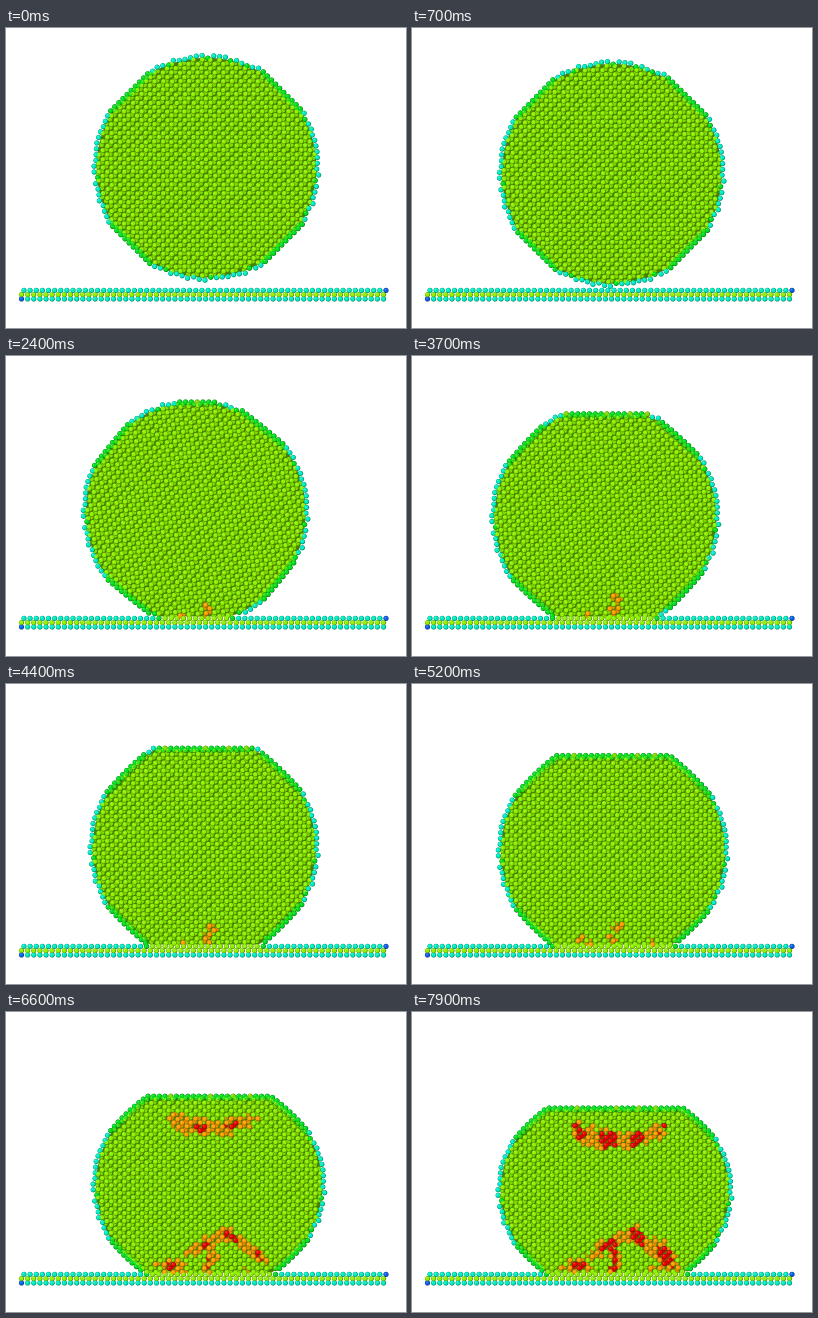
Write a matplotlib script that moves like this. It is 400 px wide and 300 px high and loops after 8 s.

```python
import numpy as np
import matplotlib.pyplot as plt
from matplotlib.animation import FuncAnimation

W, H, DPI = 400, 300, 100
FRAMES, STEP = 80, 100
R = 111.5          # particle radius
PITCH = 6.1        # nearest neighbour distance
BASE = 262         # top row of the substrate
N_RIM = 120

LIME = np.array([0.56, 0.95, 0.0])
GREEN = np.array([0.0, 0.87, 0.12])
CYAN = np.array([0.0, 0.93, 0.76])
BLUE = np.array([0.06, 0.38, 0.92])
ORANGE = np.array([1.0, 0.63, 0.0])
RED = np.array([0.95, 0.02, 0.0])

rng = np.random.default_rng(4)


def ramp(t, a, b):
    return np.clip((t - a) / (b - a), 0, 1)


def bump(t, mid, width):
    return np.exp(-((t - mid) / width) ** 2)


class Pose:
    """Place and shape of the particle at time t in seconds."""

    def __init__(self, t):
        self.t = t
        self.cx = 200.6 - 12 * bump(t, 2.8, 1.25) + 2.5 * ramp(t, 4.5, 6.6)
        self.cy = 139.7 + 8.7 * min(t, 1.4) + 4.2 * max(t - 1.4, 0)
        self.rx = R + 4.6 * ramp(t, 2.4, 7.9)
        self.ry = R - 7.5 * ramp(t, 5, 7.5)
        self.top = 24.2 + 9.1 * t
        self.tilt = -np.radians(6) * bump(t, 2.6, 1.2)
        self.squash = 1 - .11 * ramp(t, 1.4, 7.9)
        self.depth = 1 - .6 * ramp(t, 1, 7)
        self.centre = np.array([self.cx, self.cy])

    def radius(self, a):
        """Relative radius at screen angle a, and whether it is on a facet."""
        half = np.radians(14.5)
        d = np.abs((a - self.tilt) % (np.pi / 2) - np.pi / 4)
        cut = 1 - np.cos(half) / np.cos(d)
        return 1 - self.depth * np.maximum(cut, 0), d < half

    def outline(self):
        a = np.linspace(np.pi / 2, 2.5 * np.pi, 1441)
        rho, flat = self.radius(a)
        x = self.cx + self.rx * rho * np.cos(a)
        y = self.cy + self.ry * rho * np.sin(a)
        return x, np.clip(y, self.top, BASE), flat


# Lattice in the particle frame, rows run from lower left to upper right
k = np.arange(-26, 27) * PITCH
gu, gv = (g.ravel() for g in np.meshgrid(k, k))


def layer(du, dv):
    u, v = gu + du, gv + dv
    pts = np.stack([u - v, u + v], 1) / np.sqrt(2)
    pts = pts[np.hypot(*pts.T) < 1.2 * R]
    return pts + rng.normal(0, .2, pts.shape), rng.uniform(.65, 1.35, len(pts))


FRONT, BACK = layer(0, 0), layer(1.5, PITCH / 2)
rim_inset = rng.uniform(-1, 2.4, N_RIM)

# Substrate: three rows with one loose end on each side
col = np.arange(60) * 6.136
sub = np.vstack([np.stack([x0 + col, np.full(60, y)], 1)
                 for x0, y in ((15.5, 271), (15.5, 266.7), (18, BASE + .4))])
sub_color = np.repeat([CYAN, LIME, CYAN], 60, axis=0)
sub_color[[0, -1]] = BLUE

# Small defects near the contact: x, y, half width, half height, start
SEEDS = [(201, 255, 5, 7, 1.1), (176, 259, 4, 3, 2.0), (205, 244, 7, 5, 3.2),
         (169, 254, 5, 4, 4.6), (240, 258, 4, 3, 4.6),
         (164, 254, 15, 6, 5.4), (203, 246, 6, 14, 5.4)]


def defects(p, noise, pose):
    """Orange and red masks: contact seeds, a chevron below, a bowl above."""
    x, y = p.T
    t = pose.t
    dist = np.full(len(p), 9.0)
    for sx, sy, w, h, start in SEEDS:
        if t >= start:
            dist = np.minimum(dist, np.hypot((x - sx) / w, (y - sy) / h))
    late = ramp(t, 5.4, 6.8)
    if late > 0:
        ridge = 221 + np.where(x < 222, .48 * (222 - x), .75 * (x - 222))
        wide = 8 + 5 * ramp(t, 6.6, 7.9) * ramp(x, 222, 250)
        chevron = np.hypot((y - ridge) / wide, ((x - 221) / 46) ** 4)
        sag = pose.top + 32 - 13 * ((x - 205) / 48) ** 2
        bowl = np.hypot((y - sag) / 9, ((x - 206) / 47) ** 4)
        dist = np.minimum(dist, np.minimum(chevron, bowl) / late)
    clump = np.cos(2 * np.pi * (x - 167) / 29) > .3 - .3 * ramp(t, 6.6, 7.6)
    hot = 1.0 * ramp(t, 5.6, 7.4)
    return dist < noise, clump & (dist < .75 * hot * noise)


def lattice(atoms, pose):
    pts, noise = atoms
    c, s = np.cos(pose.tilt), np.sin(pose.tilt)
    x = pose.cx + (c * pts[:, 0] - s * pts[:, 1]) * pose.rx / R
    y = pose.cy + (s * pts[:, 0] + c * pts[:, 1]) * pose.squash
    nx, ny = (x - pose.cx) / pose.rx, (y - pose.cy) / pose.ry
    rho, _ = pose.radius(np.arctan2(ny, nx))
    keep = (np.hypot(nx, ny) < rho - .02) & (y > pose.top + 2) & (y < BASE - 1)
    p, noise = np.stack([x, y], 1)[keep], noise[keep]
    color = np.tile(LIME, (len(p), 1))
    warm, hot = defects(p, noise, pose)
    color[warm] = ORANGE
    color[hot] = RED
    return p, color


def rim(pose):
    """Surface atoms: green on flat parts, ragged cyan on curved ones."""
    x, y, flat = pose.outline()
    arc = np.r_[0, np.cumsum(np.hypot(np.diff(x), np.diff(y)))]

    def sample(offset):
        s = (np.arange(N_RIM) + offset) / N_RIM * arc[-1]
        p = np.stack([np.interp(s, arc, x), np.interp(s, arc, y)], 1)
        roof = p[:, 1] < pose.top + .3
        return p, roof, roof | (np.interp(s, arc, flat) > .5)

    p, roof, green = sample(.25)
    out = (p - pose.centre) / np.hypot(*(p - pose.centre).T)[:, None]
    p = p - out * np.where(green, 0, rim_inset)[:, None]
    color = np.where((green | (rim_inset > 1.6))[:, None], GREEN, CYAN)
    color[roof & (rim_inset > 1.4)] = LIME * .9
    on = p[:, 1] < BASE - 2

    q, _, dense = sample(.75)
    q = pose.centre + (q - pose.centre) * (1 - 2.4 / R)
    dense &= q[:, 1] < BASE - 5
    inner = np.tile(GREEN * .6 + LIME * .35, (dense.sum(), 1))
    return np.vstack([q[dense], p[on]]), np.vstack([inner, color[on]])


def substrate(pose):
    color = sub_color.copy()
    x, y, _ = pose.outline()
    touch = x[y > BASE - .5]
    if len(touch):
        gap = np.abs(sub[:, 0] - touch.mean()) - np.ptp(touch) / 2
        row = sub[:, 1] < BASE + 2
        color[row & (gap < 4)] = GREEN
        color[row & (gap < -2)] = LIME
    return sub, color


fig = plt.figure(figsize=(W / DPI, H / DPI), dpi=DPI, facecolor="white")
ax = fig.add_axes([0, 0, 1, 1])
ax.set(xlim=(0, W), ylim=(H, 0))
ax.axis("off")


def discs(d, z):
    return ax.scatter([], [], s=(d * 72 / DPI) ** 2, linewidths=0, zorder=z)


body, = ax.fill([0, 1, 1], [0, 0, 1], color=(.29, .50, 0), lw=0, zorder=1)
rear = discs(4.4, 2)
shade, face, glint = discs(5.2, 3), discs(4.3, 4), discs(1.5, 5)


def put(art, p, color, shift=0):
    art.set_offsets(p - shift)
    art.set_facecolor(np.clip(color, 0, 1))


def draw(n):
    pose = Pose(n * STEP / 1000)
    x, y, _ = pose.outline()
    body.set_xy(pose.centre + (np.stack([x, y], 1) - pose.centre) * .985)
    p, color = lattice(BACK, pose)
    put(rear, p, color * .92, .2)
    parts = [substrate(pose), lattice(FRONT, pose), rim(pose)]
    p, color = (np.vstack(a) for a in zip(*parts))
    put(shade, p, color * .58)
    put(face, p, color, .25)
    put(glint, p, color * .7 + .28, .8)
    return body, rear, shade, face, glint


anim = FuncAnimation(fig, draw, frames=FRAMES, interval=STEP,
                     init_func=lambda: draw(0), repeat=True, repeat_delay=0,
                     blit=False)
plt.show()
```
